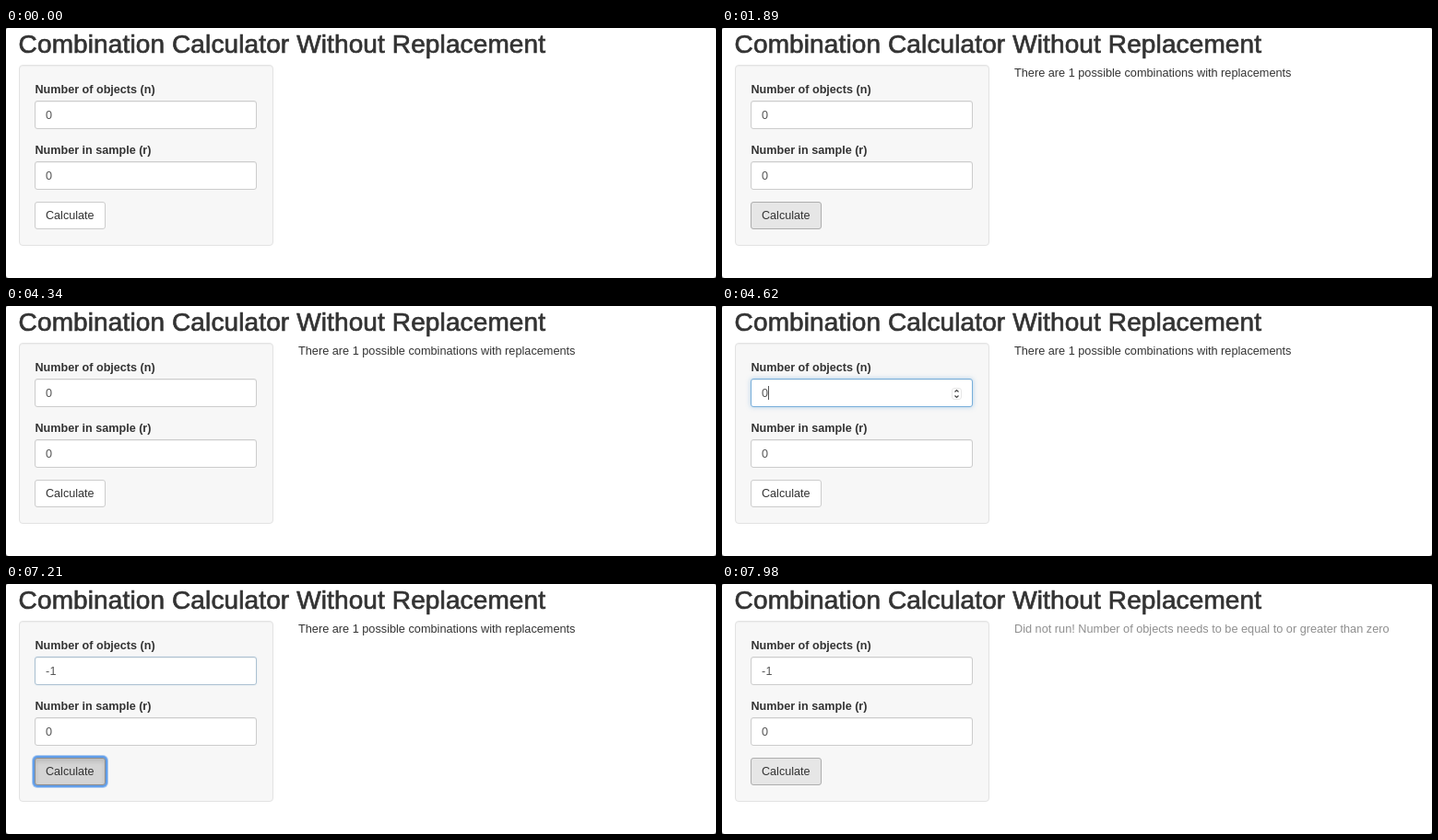
An HTML page that plays this animation: 770x272 px, repeating every 8000 ms.

```html
<!DOCTYPE html>
<html lang="en">
<head>
<meta charset="utf-8">
<title>Combination Calculator</title>
<style>
  html, body { margin: 0; width: 100%; height: 100%; overflow: hidden; background: #666; }
  #stage { position: relative; width: 770px; height: 272px; background: #fff; border-radius: 2px 2px 3px 3px; }
  #stage > * { position: absolute; box-sizing: border-box; }
  .panel {
    left: 14px; top: 40px; width: 276px; height: 197px;
    background: #f7f7f7; border: 1px solid #e3e3e3; border-radius: 4px;
    box-shadow: inset 0 1px 1px rgba(0, 0, 0, .04);
  }
  .field {
    left: 31px; width: 241px; height: 31px;
    background: #fff; border: 1px solid #ccc; border-radius: 3px;
    box-shadow: inset 0 1px 1px rgba(0, 0, 0, .06);
  }
  #button {
    left: 31px; top: 189px; width: 77px; height: 30px;
    background: #fff; border: 1px solid #ccc; border-radius: 3px;
  }
  #button.hover { background: #e6e6e6; border-color: #adadad; }
  #button.pressed {
    background: #d4d4d4; border-color: #8c8c8c;
    box-shadow: inset 0 3px 5px rgba(0, 0, 0, .125), 0 0 0 2px #619eea, 0 0 0 3px rgba(97, 158, 234, .5);
  }
  svg { left: 0; top: 0; }
  text { font: 12.6px "Liberation Sans", Arial, sans-serif; fill: #333; }
  .title { font-size: 28px; letter-spacing: .12px; stroke: #333; stroke-width: .7px; }
  .label { font-weight: bold; }
  .value { fill: #555; letter-spacing: .4px; }
  #output { font-size: 12.72px; }
</style>
</head>
<body>
<div id="stage">
  <div class="panel"></div>
  <div class="field" id="objects" style="top: 79px"></div>
  <div class="field" style="top: 145px"></div>
  <div id="button"></div>
  <svg width="770" height="272">
    <defs>
      <g id="stepper" fill="none">
        <rect x="249.5" y="89.5" width="10" height="12" rx="2.5" stroke="#e6e6e6"/>
        <path d="M252.5 93.5l2-2 2 2M252.5 97.5l2 2 2-2" stroke="#444" stroke-width="1.2"/>
      </g>
    </defs>
    <text class="title" x="13.6" y="26.5">Combination Calculator Without Replacement</text>
    <text class="label" x="31.5" y="71">Number of objects (n)</text>
    <text class="label" x="31.5" y="137">Number in sample (r)</text>
    <text class="value" id="value" x="43" y="99"></text>
    <text class="value" x="43" y="165">0</text>
    <text x="43" y="208">Calculate</text>
    <text id="output" x="317" y="53"></text>
    <rect id="caret" y="87" width="1" height="15" fill="#555"/>
    <use id="stepper1" href="#stepper"/>
    <use id="stepper2" href="#stepper" y="66"/>
  </svg>
</div>
<script>
  const LOOP = 8000, STEP = 70;
  const $ = id => document.getElementById(id);

  // [start, text, caret x]
  const typing = [[0, '0', 50], [5600, '', 43], [6160, '-', 48], [6300, '-1', 55]];
  const messages = [
    [0, '', '#333'],
    [1680, 'There are 1 possible combinations with replacements', '#333'],
    [7700, 'Did not run! Number of objects needs to be equal to or greater than zero', '#8f8f8f']
  ];
  const buttonStates = [
    [0, ''], [1470, 'pressed'], [1610, 'hover'], [3920, ''],
    [6790, 'hover'], [7070, 'pressed'], [7350, 'hover']
  ];

  const at = (list, t) => list.filter(([start]) => start <= t).pop();
  const ramp = (t, from, to) => {
    const p = Math.min(1, Math.max(0, (t - from) / (to - from)));
    return p * p * (3 - 2 * p);
  };
  const mix = (a, b, p) => a + (b - a) * p;
  const show = (id, visible) => { $(id).style.display = visible ? '' : 'none'; };

  function draw(t) {
    const [, text, caretX] = at(typing, t);
    $('value').textContent = text;
    $('caret').setAttribute('x', caretX);
    show('caret', t >= 4550 && t < 7070);
    show('stepper1', t >= 4410 && t < 7070);
    show('stepper2', t >= 4060 && t < 4340);

    const [, message, color] = at(messages, t);
    $('output').textContent = message;
    $('output').style.fill = color;
    $('button').className = at(buttonStates, t)[1];

    const focus = ramp(t, 4480, 4620) - ramp(t, 7070, 7310);
    const field = $('objects').style;
    field.borderColor = `rgb(${mix(204, 120, focus)}, ${mix(204, 174, focus)}, ${mix(204, 218, focus)})`;
    field.boxShadow = `inset 0 1px 1px rgba(0, 0, 0, .06), 0 0 ${5 * focus}px rgba(102, 165, 220, ${.5 * focus})`;
  }

  function tick() {
    const t = performance.now() % LOOP;
    draw(Math.floor(t / STEP) * STEP);
    requestAnimationFrame(tick);
  }
  tick();
</script>
</body>
</html>
```
